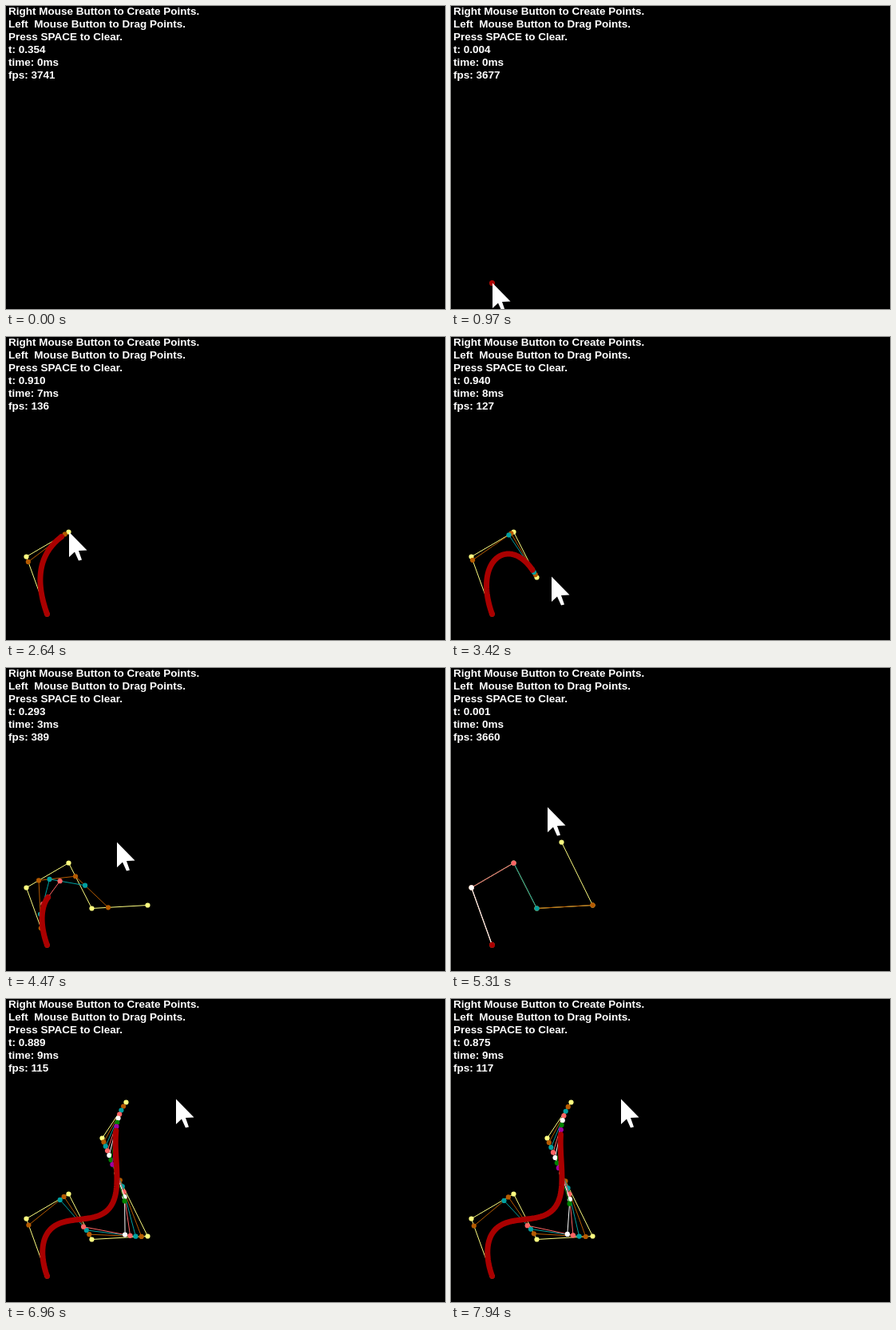
An HTML page with a canvas for the animation above (8 s loop, 550 by 380 pixels).

```html
<!DOCTYPE html>
<html lang="en">
<head>
<meta charset="utf-8">
<title>Bezier curve construction</title>
<style>
  html, body { margin: 0; width: 100%; height: 100%; overflow: hidden; background: #000; }
  canvas { display: block; }
</style>
</head>
<body>
<canvas id="stage" width="550" height="380"></canvas>
<script>
const ctx = document.getElementById('stage').getContext('2d');
const LOOP = 8000;
const STEP = LOOP / 115;

// x, y, step at which the point is created
const POINTS = [
  [51, 347, 14], [25, 275, 26], [78, 244, 36], [107, 301, 44],
  [177, 297, 56], [138, 218, 65], [120, 174, 77], [150, 129, 92]
];
// The pointer enters from below, visits every point and stops to the right.
const ROUTE = [[462, 384, -2], ...POINTS, [212, 125, 101]];

const ARROW = [[0, 0], [0, 31.5], [7, 25], [12, 36], [16, 35], [12, 23.5], [22.5, 23]];
const LEVELS = ['#ffff80', '#b45a00', '#00a0a0', '#ff6464', '#ffffff', '#008200', '#a000a0'];
const CURVE = '#aa0000';

const mix = (a, b, u) => a + (b - a) * u;
const clamp = u => Math.max(0, Math.min(1, u));
const smooth = u => u * u * (3 - 2 * u);

const reduce = (pts, t) =>
  pts.slice(1).map((p, i) => [mix(pts[i][0], p[0], t), mix(pts[i][1], p[1], t)]);

function curvePoint(pts, t) {
  while (pts.length > 1) pts = reduce(pts, t);
  return pts[0];
}

function trace(pts) {
  ctx.beginPath();
  pts.forEach(([x, y]) => ctx.lineTo(x + 0.5, y + 0.5));
}

function drawLevel(pts, color) {
  ctx.strokeStyle = ctx.fillStyle = color;
  ctx.lineWidth = 1;
  trace(pts);
  ctx.stroke();
  for (const [x, y] of pts) {
    ctx.beginPath();
    ctx.arc(x + 0.5, y + 0.5, 3.1, 0, Math.PI * 2);
    ctx.fill();
  }
}

function drawCurve(pts, t) {
  const parts = 80;
  const path = [];
  for (let i = 0; i <= parts; i++) path.push(curvePoint(pts, t * i / parts));
  ctx.strokeStyle = CURVE;
  ctx.lineWidth = 7;
  ctx.lineCap = ctx.lineJoin = 'round';
  trace(path);
  ctx.stroke();
}

function drawPointer(step) {
  // Rest two steps on a point, then arrive one step before the next is made.
  const next = Math.max(1, ROUTE.findIndex(p => p[2] > step));
  const i = step >= ROUTE.at(-1)[2] ? ROUTE.length - 1 : next;
  const [a, b] = [ROUTE[i - 1], ROUTE[i]];
  const u = smooth(clamp((step - a[2] - 2) / (b[2] - a[2] - 3)));
  const x = Math.round(mix(a[0], b[0], u));
  const y = Math.round(mix(a[1], b[1], u));
  ctx.fillStyle = '#fff';
  trace(ARROW.map(([dx, dy]) => [x + dx + 0.5, y + dy]));
  ctx.fill();
}

function drawText(t, cost) {
  const lines = [
    'Right Mouse Button to Create Points.',
    'Left  Mouse Button to Drag Points.',
    'Press SPACE to Clear.',
    't: ' + t.toFixed(3),
    'time: ' + Math.round(cost) + 'ms',
    'fps: ' + Math.round(1000 / cost)
  ];
  ctx.font = 'bold 13.5px "Liberation Sans", Arial, sans-serif';
  ctx.fillStyle = '#fff';
  lines.forEach((line, i) => ctx.fillText(line, 3, 11 + i * 16));
}

function draw(ms) {
  const step = Math.floor((ms + 12) / STEP);
  const t = 0.5 + 0.5 * Math.sin(0.1002 * step - 2.8453);
  const pts = POINTS.filter(p => step >= p[2]);

  // Render time grows with the drawn length and the number of points.
  const idle = 1000 / (3741 - 90 * Math.abs(Math.sin(step * 2.3)));
  const cost = pts.length ? Math.max(idle, (7 + 0.35 * pts.length) * t) : idle;

  ctx.fillStyle = '#000';
  ctx.fillRect(0, 0, 550, 380);

  if (pts.length) {
    let level = pts;
    for (const color of LEVELS) {
      drawLevel(level, color);
      level = reduce(level, t);
    }
    drawCurve(pts, t);
  }
  drawText(t, cost);
  drawPointer(step);
}

const start = performance.now();
function tick() {
  draw((performance.now() - start) % LOOP);
  requestAnimationFrame(tick);
}
draw(0);
requestAnimationFrame(tick);
</script>
</body>
</html>
```
